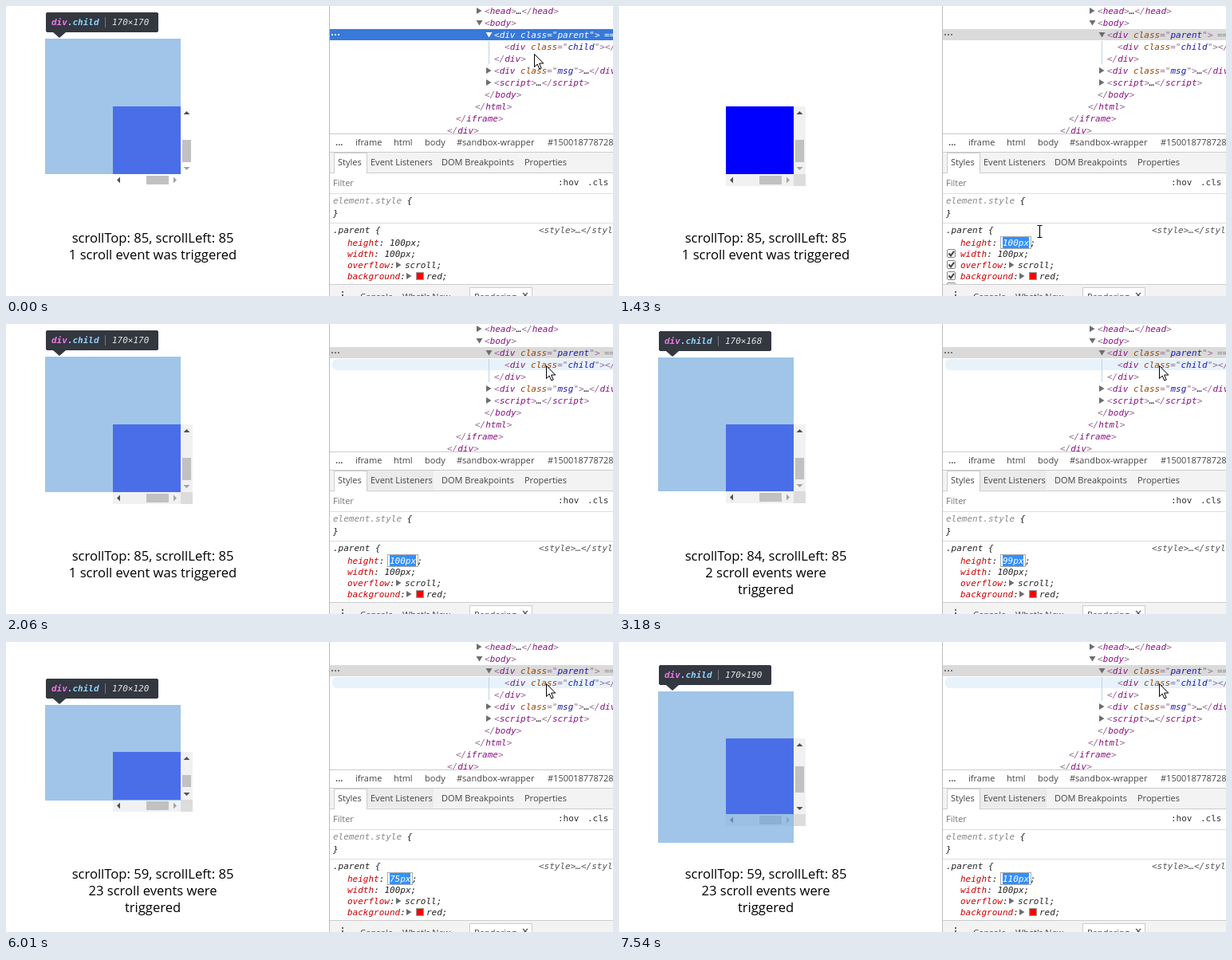
Write an HTML page that moves like this. It is 761 px wide and 364 px high and loops after 8 s.

```html
<!DOCTYPE html>
<html lang="en">
<head>
<meta charset="utf-8">
<title>Scroll events on resize</title>
<style>
html, body { margin: 0; width: 100%; height: 100%; overflow: hidden; background: #fff; }
svg { display: block; }
rect { shape-rendering: crispEdges; }
text { white-space: pre; }
.code { font: italic 11px "DejaVu Sans Mono", "Liberation Mono", monospace; fill: #222; }
.mono { font: 11px "DejaVu Sans Mono", "Liberation Mono", monospace; fill: #333; }
.ui { font: 11px "Open Sans", "Noto Sans", sans-serif; fill: #444; }
.msg { font: 16.6px "Open Sans", "Noto Sans", sans-serif; fill: #000; text-anchor: middle; }
.punct { fill: #946a90; }
.tag { fill: #881280; }
.attr { fill: #994500; }
.val { fill: #1a1aa6; }
.prop { fill: #c80000; }
.dim { fill: #888; }
.sel text, .sel tspan, .sel path { fill: #fff; }
</style>
</head>
<body>
<script>
const LOOP = 8000, W = 761, H = 364, SPLIT = 405, BAR = 15, CHAR = 6.62;
const BLUE_TINT = 'rgba(111,168,220,.66)', ORANGE_TINT = 'rgba(246,178,107,.66)';
const NS = 'http://www.w3.org/2000/svg';

const set = (node, attrs) => {
  for (const k in attrs) node.setAttribute(k, attrs[k]);
  return node;
};
const add = (parent, name, attrs = {}, text) => {
  const node = set(document.createElementNS(NS, name), attrs);
  if (text !== undefined) node.textContent = text;
  return parent.appendChild(node);
};
const box = (x, y, width, height) => ({ x, y, width, height });
const rect = (p, x, y, w, h, fill) => add(p, 'rect', { ...box(x, y, w, h), fill });
const text = (p, x, y, cls, str) => add(p, 'text', { x, y, class: cls }, str);
const path = (p, d, fill) => add(p, 'path', { d, fill });
const group = p => add(p, 'g');
const show = (node, on) => node.style.display = on ? '' : 'none';

const svg = add(document.body, 'svg', { width: W, height: H, viewBox: `0 0 ${W} ${H}` });

// Page
const page = group(svg);
rect(page, 0, 0, SPLIT, H, '#fff');
const parentBox = rect(page, 134, 0, 100, 100, '#f1f1f1');
const childBox = rect(page, 134, 0, 85, 85, '#00f');
const vThumb = rect(page, 221, 0, 11, 28, '#c1c1c1');
const upArrow = path(page, 'M222.5 3H230.5L226.5 -1Z', '#505050');
const downArrow = path(page, 'M222.5 -2H230.5L226.5 2Z');
const hBar = group(page);
const corner = rect(hBar, 219, 0, BAR, BAR, '#dcdcdc');
rect(hBar, 176, 2, 28, 11, '#c1c1c1');
path(hBar, 'M143 3.5V11.5L139 7.5Z', '#505050');
path(hBar, 'M210 3.5V11.5L214 7.5Z', '#a3a3a3');
const lines = [297, 318, 339].map(y => text(page, 184, y, 'msg', ''));

// Inspector overlay
const tint = rect(page, 49, 0, 170, 170, BLUE_TINT);
const parentTint = rect(page, 134, 126, 100, 100, BLUE_TINT);
const margin = path(page, `M0 0H${SPLIT}V${H}H0ZM134 126V226H234V126Z`, ORANGE_TINT);
const tip = group(page);
add(tip, 'rect', { ...box(50, 0, 141, 25), rx: 2.5, fill: '#333740' });
path(tip, 'M59 25H75L67 32Z', '#333740');
rect(tip, 124, 6, 1, 13, '#73777f');
const tipName = text(tip, 57, 16, 'code');
tipName.style.fontWeight = 'bold';
add(tipName, 'tspan', { fill: '#ee78e6' }, 'div');
add(tipName, 'tspan', { fill: '#8ed3fb' }, '.child');
const tipSize = text(tip, 133, 16, 'code', '');
tipSize.style.fill = '#e4e4e4';

// Elements tree
const tools = group(svg);
rect(tools, SPLIT, 0, W - SPLIT, H, '#fff');
const selRow = rect(tools, 406, 29, W - 406, 14, '#3879d9');
const hoverRow = add(tools, 'rect', { ...box(409, 44, 360, 14), rx: 6, fill: '#e8f2fb' });
rect(tools, 605, 44, 1, 29, '#b9d6e2');

const markup = (p, x, y, str) => {
  const line = text(p, x, y, 'code');
  const span = (cls, s) => add(line, 'tspan', { class: cls }, s);
  let inValue = false;
  for (const part of str.split(/(<\/?|>|="|"|…)/)) {
    if (!part) continue;
    if (/^[<>="]/.test(part)) {
      span('punct', part);
      inValue = part === '="';
    } else if (part === '…') span('', part);
    else if (inValue) span('val', part);
    else {
      const [name, attr] = part.split(' ');
      if (name) span('tag', name);
      if (attr) span('attr', ' ' + attr);
    }
  }
  return line;
};
const closed = (p, x, y) => path(p, `M${x} ${y - 4}V${y + 4}L${x + 6.5} ${y}Z`, '#6e6e6e');
const opened = (p, x, y) => path(p, `M${x - .5} ${y - 3}H${x + 7.5}L${x + 3.5} ${y + 3.5}Z`, '#6e6e6e');

const selected = group(tools);
[[600, '<head>…</head>', closed], [600, '<body>', opened],
 [612, '<div class="parent">', opened, selected], [625, '<div class="child"></div>'],
 [612, '</div>'], [612, '<div class="msg">…</div>', closed], [612, '<script>…<\/script>', closed],
 [600, '</body>'], [588, '</html>'], [564, '</iframe>'], [553, '</div>']
].forEach(([x, str, arrow, p = tools], i) => {
  const y = 6 + i * 15;
  if (arrow) arrow(p, x - 10, y);
  markup(p, x, y + 4, str);
});
text(selected, 750, 40, 'code dim', '== $0');
for (const x of [408, 412, 416]) path(selected, `M${x} 35h2v2h-2z`, '#777');

// Breadcrumbs and tabs
const rule = (y, fill = '#ccc') => rect(tools, SPLIT, y, W - SPLIT, 1, fill);
const tab = (x, y, w, h) => {
  rect(tools, x, y, w, h, '#ccc');
  rect(tools, x + 1, y + 1, w - 2, h - 1, '#fff');
};
rule(160);
rule(183);
text(tools, 413, 175, 'ui', '...').style.fontWeight = 'bold';
[[438, 'iframe'], [486, 'html'], [525, 'body'], [565, '#sandbox-wrapper'], [679, '#150018778728']]
  .forEach(([x, s]) => text(tools, x, 175, 'ui', s));
rect(tools, SPLIT, 184, W - SPLIT, 25, '#f3f3f3');
const tabHover = rect(tools, 453, 184, 83, 24, '#ebebeb');
rule(209);
tab(411, 184, 42, 26);
[[416, 'Styles'], [457, 'Event Listeners'], [546, 'DOM Breakpoints'], [650, 'Properties']]
  .forEach(([x, s]) => text(tools, x, 200, 'ui', s));
text(tools, 410, 226, 'ui', 'Filter').style.fill = '#777';
text(tools, 692, 225, 'mono', ':hov');
text(tools, 729, 225, 'mono', '.cls');
rule(235, '#ddd');

// Style rules
const pair = (x, y, ...parts) => {
  const line = text(tools, x, y, 'code');
  for (let i = 0; i < parts.length; i += 2) add(line, 'tspan', { class: parts[i] }, parts[i + 1]);
};
pair(410, 248, 'dim', 'element.style', '', ' {');
text(tools, 410, 264, 'code', '}');
rule(272, '#ddd');
text(tools, 410, 285, 'code', '.parent {');
text(tools, 668, 285, 'code', '<style>…</style>').style.fill = '#555';

const rowY = i => 301 + i * 14;
['height', 'width', 'overflow', 'background', 'position'].forEach((name, i) =>
  pair(428, rowY(i), 'prop', name, '', ':'));
text(tools, 474.5, rowY(1), 'code', '100px;');
closed(tools, 489, rowY(2) - 4);
text(tools, 500, rowY(2), 'code', 'scroll;');
closed(tools, 502, rowY(3) - 4);
rect(tools, 514, 334, 10, 10, '#999');
rect(tools, 515, 335, 8, 8, '#f00');
text(tools, 527, rowY(3), 'code', 'red;');
text(tools, 494, rowY(4), 'code', 'relative;');

const field = add(tools, 'rect', { ...box(478.5, 289.5, 38, 15), fill: '#fff', stroke: '#aaa' });
const mark = rect(tools, 481, 290, 34, 14, '#3390ff');
const value = text(tools, 481, 301, 'code', '');
const semi = text(tools, 0, 301, 'code', ';');

const checks = group(tools);
const checkbox = i => {
  const g = group(checks), y = rowY(i) - 10;
  add(g, 'rect', { ...box(411.5, y + .5, 10, 10), rx: 2, fill: '#f4f4f4', stroke: '#888' });
  add(g, 'path', { d: `M413.5 ${y + 5.5}l2.5 2.8l4 -5.5`, fill: 'none', stroke: '#444', 'stroke-width': 2 });
  return g;
};
const firstCheck = [0, 1, 2, 3, 4].map(checkbox)[0];

// Drawer
rect(tools, SPLIT, 349, W - SPLIT, 15, '#f3f3f3');
rule(349);
tab(581, 353, 79, 12);
for (const y of [358, 362]) rect(tools, 421, y, 2, 2, '#666');
[[444, 'Console'], [497, "What's New"], [587, 'Rendering']]
  .forEach(([x, s]) => text(tools, x, 369, 'ui', s));
add(tools, 'path', { d: 'M648 360l6 6M654 360l-6 6', stroke: '#555', 'stroke-width': 1.3 });
rect(tools, SPLIT, 0, 1, H, '#bbb');

// Pointer
const arrow = add(svg, 'path', {
  d: 'M.5 .5V16.5L4.2 13L6.8 19L9.2 18L6.6 12H11.8Z', fill: '#fff', stroke: '#000'
});
const beam = add(svg, 'path', {
  d: 'M-2.5 -7.5H-.3L.5 -6.8L1.3 -7.5H3.5M.5 -7V7M-2.5 7.5H-.3L.5 6.8L1.3 7.5H3.5',
  fill: 'none', stroke: '#000', 'stroke-width': 1.1
});

// Pointer steps: time, x, y
const moves = [
  [0, 662, 60], [90, 657, 66], [180, 645, 87], [270, 625, 119], [360, 600, 156],
  [450, 575, 191], [540, 552, 223], [630, 533, 253], [710, 520, 276], [800, 511, 290],
  [890, 506, 297], [980, 506, 298], [1260, 510, 296], [1430, 527, 283], [1530, 556, 237],
  [1620, 604, 166], [1700, 648, 97], [1790, 671, 59], [1880, 675, 55], [1970, 677, 53],
  [2060, 677, 52]
];

const steps = (t, start, length, max) => Math.min(max, Math.floor((t - start) / length));

// Key repeat: one press, a pause, then a held arrow key
const heightAt = t =>
  t < 3180 ? 100 :
  t < 3640 ? 99 :
  t < 6010 ? 98 - Math.ceil(steps(t, 3640, 86, 9) * 8 / 3) :
  t < 6470 ? 75 :
  76 + Math.floor(steps(t, 6470, 89, 12) * 34 / 12);

function draw(t) {
  const h = heightAt(t), client = h - BAR, top = Math.floor(176 - h / 2);
  const scroll = t < 6010 ? client : 59;
  const events = t < 3180 ? 1 : t < 6010 ? Math.round(23 - (h - 74) * .84) : 23;
  const childTop = top - scroll, bottom = top + client;

  set(parentBox, { y: top, height: h, fill: t < 180 ? '#fff' : '#f1f1f1' });
  set(childBox, { y: top, height: client });
  const thumb = (client - 2 * BAR) / 2;
  set(vThumb, { y: Math.floor(top + BAR + thumb * scroll / client), height: Math.round(thumb) });
  set(upArrow, { transform: `translate(0 ${top + 7})` });
  set(downArrow, { transform: `translate(0 ${bottom - 7})`, fill: scroll < client ? '#505050' : '#a3a3a3' });
  set(hBar, { transform: `translate(0 ${bottom})` });
  show(corner, t >= 180);

  lines[0].textContent = `scrollTop: ${scroll}, scrollLeft: 85`;
  lines[1].textContent = events > 1 ? `${events} scroll events were` : '1 scroll event was triggered';
  lines[2].textContent = events > 1 ? 'triggered' : '';

  const onChild = t < 180 || t >= 1880, onParent = t >= 1790 && t < 1880;
  show(tint, onChild);
  show(tip, onChild);
  show(margin, onParent);
  show(parentTint, onParent);
  set(tint, { y: childTop, height: 2 * client });
  set(tip, { transform: `translate(0 ${childTop - 33})` });
  tipSize.textContent = `170×${2 * client}`;

  const editing = t >= 1170;
  set(selRow, { fill: editing ? '#dadada' : '#3879d9' });
  set(selected, { class: editing ? '' : 'sel' });
  show(hoverRow, t >= 1790);
  set(hoverRow, { y: onParent ? 59 : 44 });
  show(tabHover, t >= 1880);

  const str = h + 'px', width = str.length * CHAR;
  value.textContent = str;
  value.style.fill = editing ? '#fff' : '#222';
  set(semi, { x: 481 + width + (editing ? 1.5 : 0) });
  set(mark, { width: Math.round(width) });
  set(field, { width: Math.round(width) + 5 });
  show(mark, editing);
  show(field, editing);

  const [, x, y] = moves.findLast(m => m[0] <= t);
  const inRule = y > 272;
  show(checks, inRule);
  show(firstCheck, !editing);
  show(arrow, !inRule);
  show(beam, inRule);
  set(inRule ? beam : arrow, { transform: `translate(${x} ${y})` });
}

const start = performance.now();
function tick() {
  draw((performance.now() - start) % LOOP);
  requestAnimationFrame(tick);
}
tick();
</script>
</body>
</html>
```
